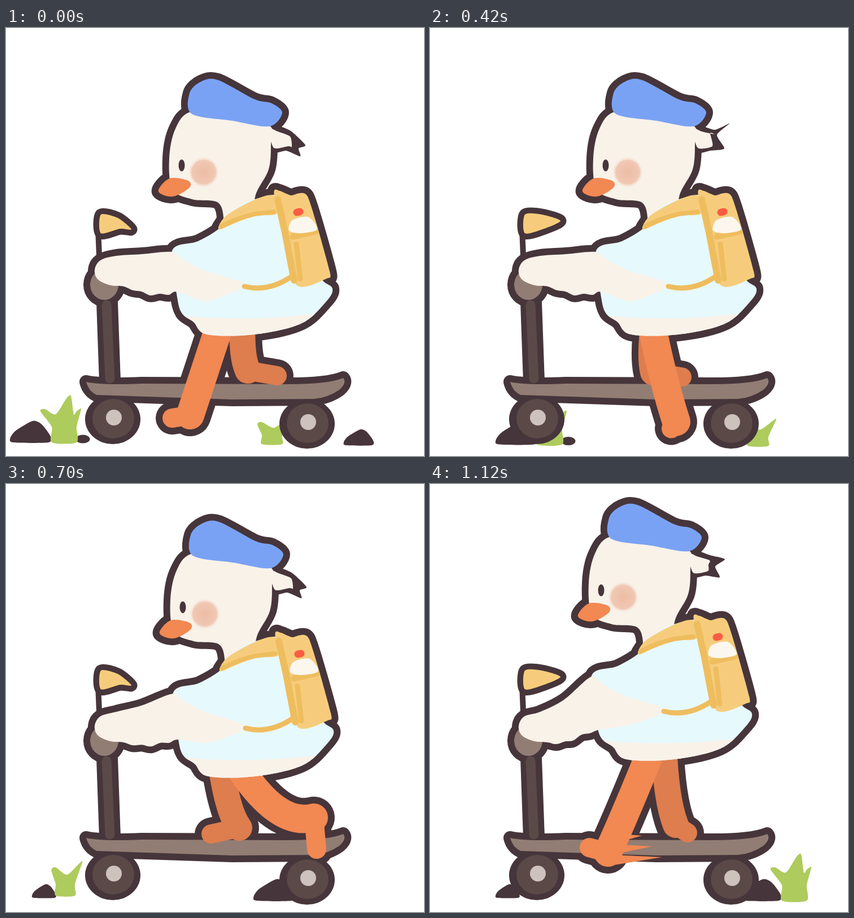
Recreate the animation shown at these times as an HTML page with a canvas. Size 740 by 757 pixels, loop 1260 ms.

```html
<!DOCTYPE html>
<html lang="en">
<head>
<meta charset="utf-8">
<title>Duck on a scooter</title>
<style>
html, body { margin: 0; width: 100%; height: 100%; overflow: hidden; background: #fff; }
canvas { display: block; width: 100vw; height: 100vh; }
</style>
</head>
<body>
<canvas id="stage" width="740" height="757"></canvas>
<script>
const ctx = document.getElementById('stage').getContext('2d');
const STEP = 140, STEPS = 9, RIM = 24;
const DARK = '#46353a', CREAM = '#f9f2e9', SHIRT = '#e6f9fd', BLUE = '#7aa2f4';
const YELLOW = '#f6cc7c', GOLD = '#eebd5e', ORANGE = '#f28852', RUST = '#de7d4d';
const METAL = '#927d74', TYRE = '#5a4947', HUB = '#cdc2bc', GREEN = '#aecb5d';

const clamp = v => Math.min(1, Math.max(0, v));
const smooth = v => { v = clamp(v); return v * v * (3 - 2 * v); };
const between = (a, b) => a.map((v, i) => (v + b[i]) / 2);

// Closed smooth curve through flat x,y points
function blob(p, k = 6) {
  const n = p.length / 2, path = new Path2D();
  const at = i => { i = (i + n) % n; return [p[2 * i], p[2 * i + 1]]; };
  path.moveTo(p[0], p[1]);
  for (let i = 0; i < n; i++) {
    const a = at(i - 1), b = at(i), c = at(i + 1), d = at(i + 2);
    path.bezierCurveTo(b[0] + (c[0] - a[0]) / k, b[1] + (c[1] - a[1]) / k,
      c[0] - (d[0] - b[0]) / k, c[1] - (d[1] - b[1]) / k, c[0], c[1]);
  }
  path.closePath();
  return path;
}
function oval(x, y, rx, ry = rx) {
  const path = new Path2D();
  path.ellipse(x, y, rx, ry, 0, 0, Math.PI * 2);
  return path;
}
function fill(path, color) { ctx.fillStyle = color; ctx.fill(path); }
function stroke(path, color, width) {
  ctx.strokeStyle = color;
  ctx.lineWidth = width;
  ctx.stroke(path);
}
function line(d, color, width) { stroke(new Path2D(d), color, width); }
function placed(x, y, sx, sy, draw) {
  ctx.save();
  ctx.translate(x, y);
  ctx.scale(sx, sy);
  draw();
  ctx.restore();
}

// Body
const head = blob([328,148, 300,178, 289,230, 295,285, 330,303, 374,308, 385,335, 378,355, 430,340,
  443,292, 465,250, 469,205, 466,172, 400,150]);
const trunk = blob([378,354, 340,377, 294,394, 302,470, 311,504, 332,520, 356,542, 440,542, 522,523,
  565,486, 578,461, 556,440, 535,375, 500,300, 440,303, 400,325]);
const hem = new Path2D('M280 505Q430 525 600 498V560H280Z');
const collar = blob([377,356, 390,332, 442,303, 476,297, 480,328, 440,332, 408,344]);
const cap = blob([329,152, 325,115, 345,95, 375,92, 440,126, 470,133, 489,150, 466,174, 400,164], 6.5);
const beak = blob([270,286, 290,266, 322,270, 325,282, 300,297, 280,296]);
const bag = blob([475,296, 484,288, 504,296, 534,298, 573,430, 568,443, 513,453], 10);
const cream = blob([501,358, 507,340, 535,334, 551,356, 522,363], 7);
const deck = new Path2D('M142 626Q170 632 240 629L500 630Q570 630 597 619Q604 628 590 640' +
  'Q570 654 545 656L400 657L160 649Q146 642 142 626Z');
const knob = oval(174, 454, 25, 27);

// The hand stays on the bar while the shoulder follows the body
function armShape(dx, dy) {
  const pts = [];
  const add = (x, y, follow = 1) => {
    const w = follow * smooth((x - 205) / 90);
    pts.push(x + dx * w, y + dy * w);
  };
  [[293,396], [240,400], [195,403], [167,411], [157,428], [163,445], [185,455]].forEach(p => add(...p));
  for (let i = 0; i <= 6; i++) {
    const u = i / 6;
    add(208 + 96 * u, 457 + 15 * Math.sin(2.4 * u) + 2 * Math.sin(16 * u), .58);
  }
  [[350,483], [385,474], [421,453], [350,428], [312,408]].forEach(p => add(...p));
  return blob(pts);
}

// Tail feather and flag both ride the wind, 0 = hanging, 2 = raised
function tailShapes(lift) {
  const nx = 518 - 5 * lift, ny = 213 - 12 * lift;
  return [
    blob([462,176, 478,172, 504,182 - lift, 530,207 - 19 * lift, nx,ny, 521,227 - 7 * lift, 496,217, 470,220], 9),
    blob([464,177, 481,183, 503,192 - 2 * lift, nx - 12,ny - 3, 500,209, 474,212], 9)
  ];
}
function flagShape(lift) {
  const curl = lift ? 0 : 1;
  return blob([168,330, 198,330 + 6 * curl, 231 - 9 * curl,341 + 15 * curl, 202,355, 168,363], 8);
}

// hip x, knee x y, ankle x y, toe x y
const near = {
  fore: [381, 352,605, 326,685, 294,690],
  down: [377, 362,610, 360,703, 336,710],
  push: [405, 462,635, 512,690, 518,707],
  back: [408, 480,608, 545,590, 550,646],
  lift: [404, 500,590, 576,556, 585,601],
  swing: [395, 350,575, 315,652, 282,643]
};
const far = {
  rest: [419, 416,580, 428,606, 480,615],
  bent: [374, 360,580, 362,612, 412,620],
  rise: [380, 392,580, 413,608, 363,619],
  tall: [384, 382,560, 408,612, 364,624],
  land: [414, 418,560, 435,603, 456,617]
};
const strides = [
  [near.fore, far.rest],
  [between(near.fore, near.down), far.rest],
  [near.down, far.rest],
  [between(near.down, near.push), between(far.rest, far.bent)],
  [near.push, far.bent],
  [near.back, far.rise],
  [near.lift, far.tall],
  [between(near.lift, near.swing), between(far.tall, far.land)],
  [near.swing, far.land]
];
function drawLeg([hip, kx, ky, ax, ay, tx, ty], dy, color, width, rim = 0) {
  line(`M${hip} ${518 + dy}Q${kx} ${ky} ${ax} ${ay}`, color, width + rim);
  line(`M${ax} ${ay}L${tx} ${ty}`, color, 34 + rim);
}

// Ground, each shape standing on y = 0
function grass(half, tips) {
  const valley = .6 * Math.min(...tips.map(t => t[1]));
  const pts = [-half,0, -half,valley * .55];
  tips.forEach(([x, y], i) => {
    if (i) pts.push((x + tips[i - 1][0]) / 2, valley);
    pts.push(x - 4, y + 5, x + 4, y + 1);
  });
  return blob([...pts, half,valley * .55, half,0], 8);
}
const tuft = grass(22, [[-38, -60], [8, -83], [26, -60]]);
const sprout = grass(18, [[-22, -40], [28, -48]]);
const mound = (w, h) => blob([-.5,-.2, -.36,-.55, .06,-1, .28,-.85, .5,-.3, .45,0, -.42,0]
  .map((v, i) => v * (i % 2 ? h : w)), 8);
const rock = mound(71, 38), stone = mound(52, 28);

function drawGround(u) {
  const x = 542 * (.45 * u + .55 * smooth((u - .32) / .68));
  placed(x, 4 * smooth(u * 2), 1, 1, () => {
    placed(43, 733, 1, 1, () => fill(rock, DARK));
    if (u < .7) fill(oval(136, 727, 12.5, 7.5), DARK);
    placed(103, 733, 1, 1, () => fill(tuft, GREEN));
  });
  const slow = 471 + 275 * u;
  if (u < .7) {
    const size = 1 - 2.1 * u;
    if (size > .5) placed(slow + 153, 738, size, size, () => fill(stone, DARK));
    placed(slow, 736 + 8 * u, 1, 1, () => fill(sprout, GREEN));
  } else {
    placed(slow - 624 + 75 * (u - .8), 732, .8, .86, () => fill(stone, DARK));
    if (u < 1) placed(slow - 586, 728, .95, 1.28, () => fill(sprout, GREEN));
  }
}

function drawScooter() {
  fill(knob, METAL);
  line('M178 490L184 620', TYRE, 17);
  for (const [x, y] of [[190, 691], [534, 699]]) {
    fill(oval(x, y, 37, 35), TYRE);
    fill(oval(x + 1, y - 2, 14), HUB);
  }
  fill(deck, METAL);
}

function drawFace(blink) {
  const glow = ctx.createRadialGradient(350, 255, 4, 350, 255, 28);
  glow.addColorStop(0, '#eebea6');
  glow.addColorStop(.7, '#f0c8b4');
  glow.addColorStop(1, '#f9f2e900');
  fill(oval(350, 255, 28), glow);
  if (blink) line('M307 246Q311 253 315 248', DARK, 3);
  else fill(oval(311, 243, 5.5, 10.5), DARK);
  fill(beak, ORANGE);
}

function drawBag() {
  fill(collar, YELLOW);
  line('M381 351Q407 337 440 329L474 325', GOLD, 8);
  fill(bag, YELLOW);
  line('M481 303L494 362L510 446', GOLD, 12);
  line('M508 369L548 360', GOLD, 11);
  line('M514 382L521 444', GOLD, 9);
  fill(cream, '#fbf7ef');
  line('M515 326L520 325', '#fb5d43', 13);
  line('M422 457Q465 468 508 438', GOLD, 9);
}

function drawBody(x, y, arm, tail, blink) {
  placed(x, y, 1, 1, () => {
    fill(head, CREAM);
    fill(tail, CREAM);
    fill(trunk, SHIRT);
    ctx.clip(trunk);
    fill(hem, CREAM);
  });
  fill(arm, CREAM);
  placed(x, y, 1, 1, () => {
    drawBag();
    fill(cap, BLUE);
    drawFace(blink);
  });
}

function drawOutline(x, y, arm, tail, flag) {
  for (const part of [deck, knob, arm]) stroke(part, DARK, RIM);
  line('M179 485L184 625', DARK, 38);
  fill(oval(189, 692, 49, 44), DARK);
  fill(oval(533, 700, 49, 44), DARK);
  line('M162 330L165 403', DARK, 10);
  stroke(flag, DARK, 21);
  placed(x, y, 1, 1, () => {
    for (const part of [head, trunk, cap, beak, bag]) stroke(part, DARK, RIM);
    fill(tail, DARK);
  });
}

function draw(now) {
  const k = Math.floor(now / STEP) % STEPS;
  const wind = 2 - Math.abs((Math.max(k, 1) + 3) % 4 - 2);
  const rise = clamp((k - 4) / 3);
  const x = rise ? 2 - 10 * clamp((k - 6) / 2) ** 2 : 0;
  const y = -55 * (1 - (1 - rise) ** 1.5);
  const arm = armShape(x, y), flag = flagShape(wind);
  const [tailDark, tailLight] = tailShapes(wind);
  const [front, rear] = strides[k];

  ctx.fillStyle = '#fff';
  ctx.fillRect(0, 0, 740, 757);
  ctx.lineJoin = ctx.lineCap = 'round';
  drawGround(clamp((k - 1) / 5));
  drawOutline(x, y, arm, tailDark, flag);
  drawLeg(rear, y, DARK, 46, RIM);
  drawLeg(front, y, DARK, 50, RIM);
  drawScooter();
  fill(flag, YELLOW);
  drawLeg(rear, y, RUST, 46);
  drawLeg(front, y, ORANGE, 50);
  if (k === STEPS - 1) {
    for (let i = 0; i < 3; i++) {
      const ty = 622 + 19 * i;
      fill(new Path2D(`M325 ${ty - 4}L${375 + 18 * i} ${ty}L325 ${ty + 14}Z`), ORANGE);
    }
  }
  drawBody(x, y, arm, tailLight, k === 4);
  requestAnimationFrame(draw);
}
requestAnimationFrame(draw);
</script>
</body>
</html>
```
